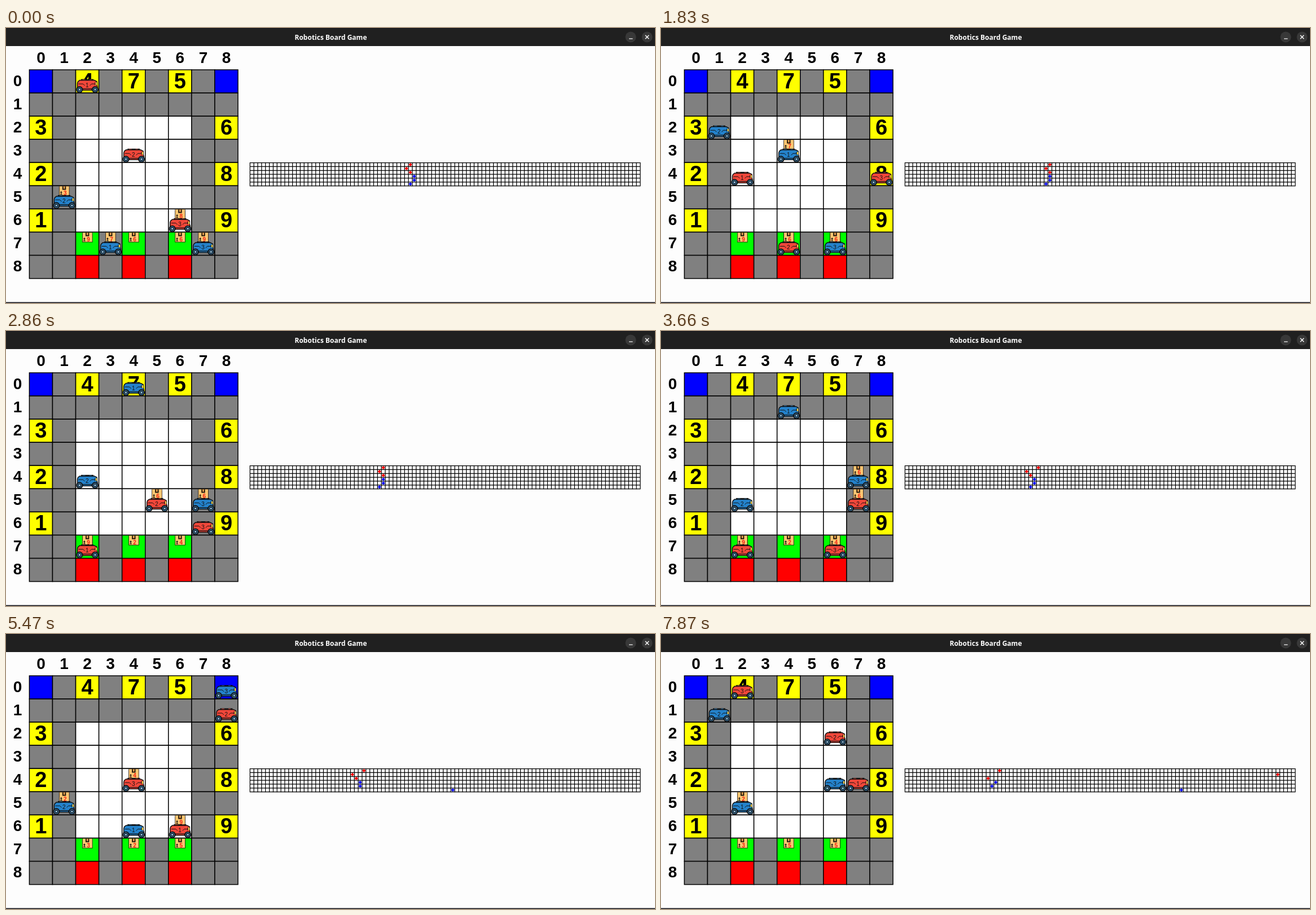
Animation, 1150 px wide and 487 px high, one loop 8000 ms. Source, as an HTML page with a canvas:

```html
<!DOCTYPE html>
<html lang="en">
<head>
<meta charset="utf-8">
<title>Robotics Board Game</title>
<style>
html, body { margin: 0; width: 100%; height: 100%; overflow: hidden; background: #fdfdfd; }
canvas { display: block; }
</style>
</head>
<body>
<canvas id="stage" width="1150" height="487"></canvas>
<script>
const g = document.getElementById('stage').getContext('2d');
const LOOP = 8000, FIRST = 57, TICK = 200.2;
const X0 = 41.4, Y0 = 74, CELL = 41.07;
const BAT = { x: 432.4, y: 238.6, cols: 101, rows: 6, size: 6.846 };
const BOARD_FONT = '"Liberation Sans", Arial, sans-serif';
const RED = '#f1473a', BLUE = '#2482cb';

// w white, . grey, b charger, g pick-up, r start, digits are drop-offs
const BOARD = [
  'b.4.7.5.b',
  '.........',
  '3.wwwww.6',
  '..wwwww..',
  '2.wwwww.8',
  '..wwwww..',
  '1.wwwww.9',
  '..g.g.g..',
  '..r.r.r..'
];
const FILL = { w: '#fff', '.': '#808080', b: '#00f', g: '#0f0', r: '#f00' };
const STEP = { U: [0, -1], D: [0, 1], L: [-1, 0], R: [1, 0], '.': [0, 0] };

// Blue moves on even ticks, red on odd ones; one letter per turn.
const ROBOTS = [
  { id: 1, red: 1, x: 2, y: 0, charge: 41, load: 0, path: 'DDDDDDD..RURRRRR.LUU' },
  { id: 2, red: 1, x: 4, y: 3, charge: 40, load: 0, path: 'DDDDRUURRUUURUU.LLDD' },
  { id: 3, red: 1, x: 6, y: 6, charge: 41, load: 8, path: 'URURLDDDLLUUULLLUUUU' },
  { id: 1, red: 0, x: 3, y: 7, charge: 42, load: 7, path: 'UUUURUUUDDDDDDDLU.LU' },
  { id: 2, red: 0, x: 1, y: 5, charge: 42, load: 3, path: 'UULURRDDDDDLUUULURUU' },
  { id: 3, red: 0, x: 7, y: 7, charge: 41, load: 9, path: 'URLDLUURUUURUULLDDDD' }
];

function simulate(ticks) {
  const robots = ROBOTS.map(r => ({ ...r }));
  const queues = { 2: [9, 2, 3], 4: [6, 2, 5], 6: [6, 4, 5] };
  for (let k = 0; k < ticks; k++) {
    for (const r of robots) {
      if (BOARD[r.y][r.x] === 'b') r.charge = Math.min(100, r.charge + 25);
      if (r.red !== k % 2) continue;
      const move = r.path[k >> 1];
      if (move === '.') continue;
      if (BOARD[r.y][r.x] === 'g') queues[r.x].shift();
      r.x += STEP[move][0];
      r.y += STEP[move][1];
      r.charge--;
      const cell = BOARD[r.y][r.x];
      if (cell === 'g') r.load = queues[r.x][0];
      else if (cell > '0' && cell <= '9') r.load = 0;
    }
  }
  return { robots, queues };
}

function rect(x, y, w, h, color) {
  g.fillStyle = color;
  g.fillRect(x, y, w, h);
}

function text(s, x, y, size, color = '#000', family = BOARD_FONT, weight = 'bold') {
  g.font = `${weight} ${size}px ${family}`;
  g.fillStyle = color;
  g.textAlign = 'center';
  g.fillText(s, x, y);
}

function shape(points, fill) {
  g.beginPath();
  points.forEach(([x, y]) => g.lineTo(x, y));
  g.closePath();
  g.fillStyle = fill;
  g.fill();
}

function disc(x, y, r, color) {
  g.beginPath();
  g.arc(x, y, r, 0, 7);
  g.fillStyle = color;
  g.fill();
}

function line(x1, y1, x2, y2, color, width) {
  g.beginPath();
  g.moveTo(x1, y1);
  g.lineTo(x2, y2);
  g.strokeStyle = color;
  g.lineWidth = width;
  g.stroke();
}

function inCell(x, y, draw) {
  g.save();
  g.translate(X0 + x * CELL, Y0 + y * CELL);
  draw();
  g.restore();
}

function drawWindow() {
  rect(0, 0, 1150, 487, '#fdfdfd');
  rect(0, 0, 1150, 32, '#202020');
  rect(0, 0, 1150, 1, '#15151c');
  rect(0, 485.4, 1150, 1.6, '#1c1c22');
  text('Robotics Board Game', 575.5, 21, 12, '#fff', '"Noto Sans", "Open Sans", sans-serif');
  disc(1107, 16, 9.5, '#383838');
  disc(1136, 16, 9.5, '#383838');
  line(1104, 19, 1110.5, 19, '#fff', 1.2);
  line(1132.8, 12.8, 1139.2, 19.2, '#fff', 1.4);
  line(1139.2, 12.8, 1132.8, 19.2, '#fff', 1.4);
}

function drawBoard() {
  for (let i = 0; i < 9; i++) {
    text(i, X0 + (i + .5) * CELL, 61.5, 28);
    text(i, 20.5, 102.5 + i * CELL, 28);
  }
  BOARD.forEach((row, y) => [...row].forEach((cell, x) => inCell(x, y, () => {
    rect(0, 0, CELL, CELL, FILL[cell] || '#ff0');
    g.strokeStyle = '#000';
    g.lineWidth = 1.5;
    g.strokeRect(0, 0, CELL, CELL);
    if (!FILL[cell]) text(cell, CELL / 2, 32.5, 38);
  })));
}

function drawBox(n) {
  rect(11.5, 1, 18.5, 17, '#1a1208');
  rect(12.3, 1, 16.9, 16.2, '#ffc772');
  rect(17.4, 1, 6.4, 6.2, '#1a1208');
  rect(19.2, 1, 2.8, 4.4, '#e6a050');
  shape([[13.2, 12.2], [15.3, 9.6], [17.4, 12.2]], '#111');
  rect(14.6, 12, 1.4, 2.4, '#111');
  rect(13.4, 14.8, 3.8, 1.2, '#111');
  text(n, 22.4, 16.2, 10, '#f02010');
}

function drawRobot(r) {
  const color = r.red ? RED : BLUE;
  rect(9.5, 16.5, 22, 3, '#111');
  rect(12, 17.2, 5, 1, color);
  rect(24, 17.2, 4, 1, color);
  // outlined body with a stepped front
  const body = [[4, 21], [7, 18.6], [33, 18.6], [37.5, 21], [37.5, 27], [38.5, 30], [38.5, 34], [3, 34], [3, 24]];
  shape(body, color);
  g.strokeStyle = '#111';
  g.lineWidth = 1.5;
  g.stroke();
  rect(35.2, 22.3, 2.2, 4.6, '#ffd84a');
  line(34.4, 22, 34.4, 27.5, '#111', 1);
  line(5, 25, 13, 25, '#111', 1);
  line(13, 25, 16, 28, '#111', 1);
  line(25, 28, 28, 25, '#111', 1);
  line(28, 25, 34, 25, '#111', 1);
  rect(11, 33, 19, 3.8, '#111');
  rect(13, 34.2, 15, 1.2, color);
  for (const x of [6.8, 34.4]) {
    disc(x, 35, 6, '#111');
    disc(x, 35, 4.3, '#35688f');
    disc(x, 35, 2.8, '#111');
    disc(x, 35, 1.7, '#8fc3e8');
  }
  text(r.id, 20.2, 31, 10, '#111', BOARD_FONT, 'normal');
}

function drawBatteries(robots) {
  const { x, y, cols, rows, size } = BAT;
  rect(x, y, cols * size, rows * size, '#fff');
  for (let i = 0; i <= cols; i++) line(x + i * size, y - .6, x + i * size, y + rows * size + .6, '#000', 1.25);
  for (let i = 0; i <= rows; i++) line(x, y + i * size, x + cols * size, y + i * size, '#000', 1.25);
  robots.forEach((r, i) => {
    const cx = x + (r.charge + .5) * size, cy = y + (i + .5) * size;
    const color = r.red ? '#f00' : '#00f';
    rect(cx - 2.9, cy - .9, 5.8, 1.8, color);
    rect(cx - .9, cy - 2.9, 1.8, 5.8, color);
    disc(cx, cy, 1.9, color);
  });
}

function frame(now) {
  const t = now % LOOP;
  const { robots, queues } = simulate(Math.max(0, Math.floor((t - FIRST) / TICK) + 1));
  drawWindow();
  drawBoard();
  for (const x in queues) inCell(+x, 7, () => drawBox(queues[x][0]));
  for (const r of robots) inCell(r.x, r.y, () => {
    if (r.load) drawBox(r.load);
    drawRobot(r);
  });
  drawBatteries(robots);
  requestAnimationFrame(draw);
}

let start;
function draw(now) {
  start ??= now;
  frame(now - start);
}
requestAnimationFrame(draw);
</script>
</body>
</html>
```
